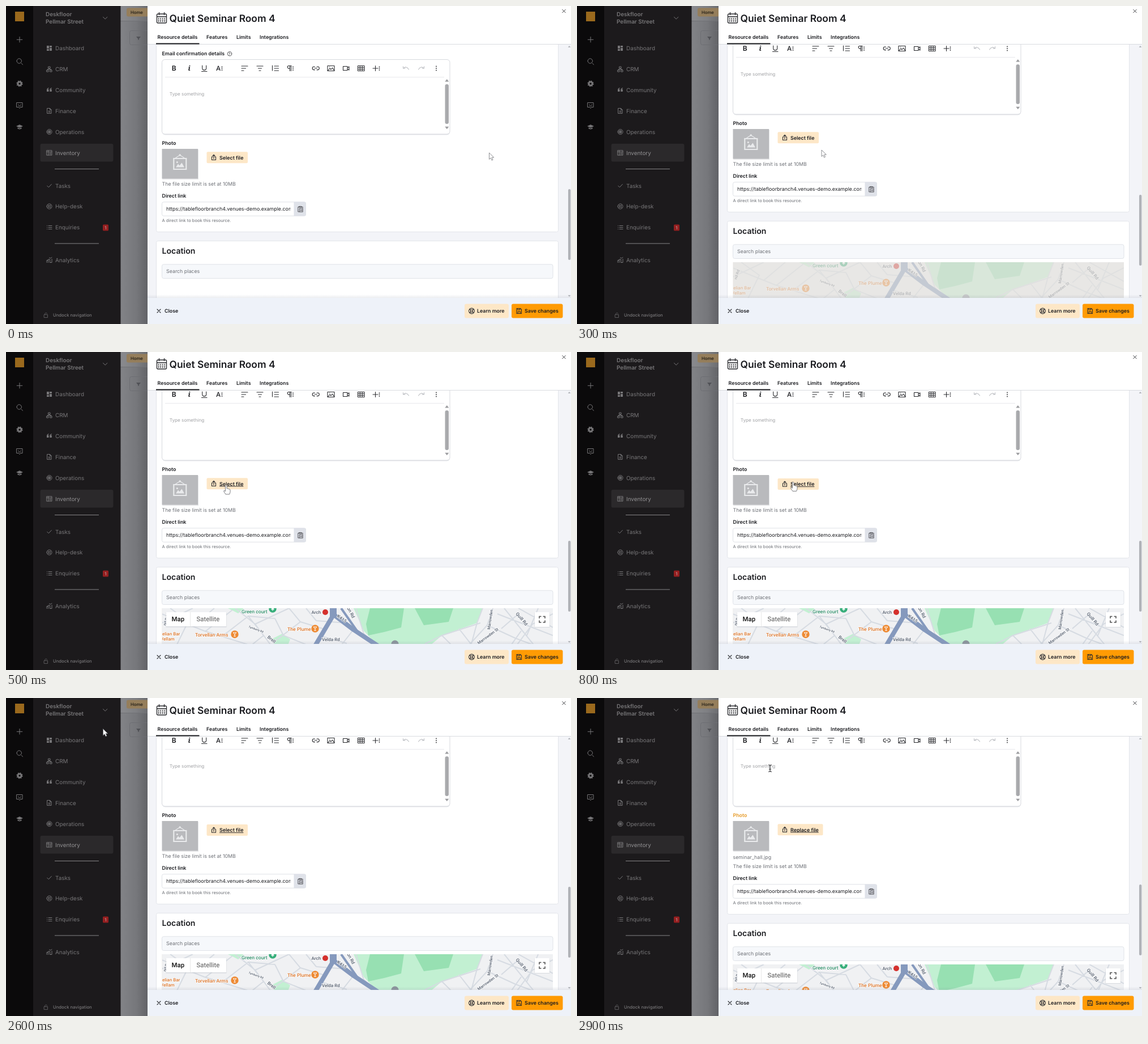
These frames come from a looping animation (998 by 561 pixels, 3 s). An HTML page:

```html
<!DOCTYPE html>
<html lang="en">
<head>
<meta charset="utf-8">
<title>Resource photo upload</title>
<style>
html, body { margin: 0; width: 100%; height: 100%; overflow: hidden; background: #fff }
svg { display: block; width: 100vw; height: 100vh }
text { font: 400 8.86px Inter, sans-serif; fill: #1b1c20; text-rendering: geometricPrecision; white-space: pre }
.b { font-weight: 600 }
.h { font-weight: 600; font-size: 14.1px }
.t { font-weight: 600; font-size: 17.4px }
.g { fill: #6c6f75 }
.dim text { fill: #777678; font-size: 9.9px }
.i { fill: none; stroke: #2b2c30; stroke-width: 1.1; stroke-linecap: round; stroke-linejoin: round }
.dim .i { stroke: #777678; stroke-width: 1 }
.f { fill: #2b2c30; stroke: none }
.dim .f { fill: #777678; stroke: none }
.card { fill: #fff; stroke: #e3e5ea }
.map text { font: 500 8px Roboto, sans-serif; fill: #515b6b; paint-order: stroke; stroke: #fff; stroke-width: 1.4px }
.map .food { fill: #d9752c }
.map .ctl { font-size: 11.4px; stroke: none; fill: #565656 }
.road { fill: none; stroke: #d6dbe2; stroke-width: 2 }
.main { fill: none; stroke: #8599bd; stroke-width: 8; stroke-linejoin: round }
</style>
</head>
<body>
<svg viewBox="0 0 998 561" preserveAspectRatio="none">
<defs>
  <linearGradient id="shade"><stop stop-color="#828387"/><stop offset=".6" stop-color="#76777b"/><stop offset="1" stop-color="#626367"/></linearGradient>
  <linearGradient id="fade" x2="0" y2="1"><stop stop-color="#8890a0" stop-opacity="0"/><stop offset="1" stop-color="#8890a0" stop-opacity=".16"/></linearGradient>
  <clipPath id="view"><path d="M250 68H998V515H250z"/></clipPath>
  <clipPath id="mapClip"><path d="M276 452H966V600H276z"/></clipPath>
  <clipPath id="linkClip"><path d="M276 340H502.500V375H276z"/></clipPath>
</defs>

<!-- dimmed page -->
<g class="dim">
  <path fill="url(#shade)" d="M202 0H250V561H202z"/>
  <path fill="#fff" opacity=".06" d="M202 0H250V26H202z"/>
  <path stroke="#707175" d="M202 26.500H250"/>
  <rect x="213" y="3.500" width="45" height="15" rx="3" fill="#957e5b"/>
  <text x="220" y="14" class="b" style="font-size:7.700px;fill:#29241c">Home</text>
  <rect x="218.500" y="43.500" width="40" height="25" rx="3" fill="none" stroke="#6d6e73"/>
  <path fill="#505156" d="M230 54h8l-3 3.500v2h-2v-2z"/>
  <path fill="#0b0a0b" d="M0 0H48V561H0z"/>
  <path fill="#1c1a1c" d="M48 0H202.500V561H48z"/>
  <rect x="16" y="10" width="16" height="17" fill="#9a691d"/>
  <text x="70" y="18" class="b">Deskfloor</text>
  <text x="70" y="31" class="b">Pellmar Street</text>
  <path class="i" d="M171.500 19.500l3.700 3.500 3.700-3.500M24 54.500v9.500M19.200 59.300h9.600M27.200 101l2.300 2.500M19 97a4.200 4.200 0 1 0 8.400 0a4.200 4.200 0 1 0-8.400 0"/>
  <circle class="i" cx="24" cy="137" r="3.100" style="stroke-width:2.800"/>
  <circle class="i" cx="24" cy="137" r="4.800" style="stroke-width:1.600;stroke-dasharray:1.900 1.870;stroke-linecap:butt"/>
  <path class="i" d="M19 170.500h10v8h-3.500l-1.500 2-1.500-2H19zM22 173.500v.5M26 173.500v.5M22 176q2 1.300 4 0"/>
  <path class="f" d="M18 212l6-2.700 6 2.700-6 2.700zM20.500 214.300l3.500 1.600 3.500-1.600v2.300q-3.500 1.600-7 0z"/>
  <rect x="60.500" y="243" width="129" height="31.500" rx="3" fill="#2b292b"/>
  <g id="nav"></g>
  <path stroke="#858486" d="M86 287.500H164M86 419H164"/>
  <rect x="171" y="385.500" width="10" height="11" rx="1.500" fill="#951f20"/>
  <text x="174.300" y="393.800" style="font-size:7.500px;fill:#c8b8b8">1</text>
  <path class="i" d="M67.500 544.500h6v5h-6zM68.700 544.500v-2q2-2.600 4 0" style="stroke:#59585a"/>
  <text x="83" y="548" style="font-size:7.700px;font-weight:500">Undock navigation</text>
</g>

<!-- drawer -->
<path fill="#f3f4f8" d="M250 0H998V561H250z"/>
<g clip-path="url(#view)"><g id="scroll">
  <rect id="card" class="card" x="265.500" y="20" width="710" height="378.500" rx="3"/>
  <text class="b" x="275.500" y="87">Email confirmation details</text>
  <circle class="i" cx="395" cy="84.300" r="3.700" style="stroke-width:.8"/>
  <text x="393.300" y="86.800" style="font-size:6.500px">?</text>
  <rect x="276" y="95.500" width="508" height="132" rx="5" fill="#e4e6ea"/>
  <rect x="275.500" y="94.500" width="508.500" height="131.500" rx="5" fill="#fff" stroke="#d7d9de"/>
  <path stroke="#e8e9ec" d="M281 125.500H774"/>
  <g id="tools">
    <text x="292.700" y="114" style="font-size:12px;font-weight:600">B</text>
    <text x="321.600" y="114" style="font:italic 600 12px 'Noto Serif',serif">i</text>
    <text x="371" y="114" style="font-size:11.500px;font-weight:500">A</text>
    <path class="i" d="M346.700 105v4.500q0 3.600 3.500 3.600t3.500-3.600V105M345.500 115.500h9.500
      M416 106h11M416 110h7.500M416 114h4M443 106h11M445.500 110h6M447 114h3
      M474 106h7.500M474 110h7.500M474 114h7.500M470.500 105v9
      M504 105.500h-4.500a2.300 2.300 0 0 0 0 4.600h1.500M501.300 105.500v9M503.500 105.500v9
      M545.500 107h-1.500a2.800 2.800 0 0 0 0 5.600h1.500M549 107h1.500a2.800 2.800 0 0 1 0 5.600h-1.500M545 109.800h4.500
      M568 105.500h12v9h-12zM569 113.500l3-3.500 2 2 2.500-3 3 4.500M571.500 107.500v.3
      M595.500 106.500h7.500v7h-7.500zM603 109l3-2v6l-3-2
      M621.500 105.500h11.500v9h-11.500zM621.500 108.500h11.500M621.500 111.500h11.500M625.300 105.500v9M629.200 105.500v9
      M652.500 105.500v9M648 110h9"/>
    <path class="i" style="stroke:#bfc1c5" d="M701.500 106.500v3.500h3.500M702 110q5-5 9.500 2M738.500 106.500v3.500h-3.500M738 110q-5-5-9.500 2"/>
    <path class="i" style="stroke-width:1.800" d="M381.500 107.500v.01M381.500 110.300v.01M381.500 113.100v.01M507 107.500v.01M507 110.300v.01M507 113.100v.01M659.500 107.500v.01M659.500 110.300v.01M659.500 113.100v.01M760 106.500v.01M760 110v.01M760 113.500v.01"/>
  </g>
  <text x="288.800" y="157.500" style="font-size:8.150px;fill:#a2a3a6">Type something</text>
  <path fill="#9c9da0" d="M775.300 133.500h7l-3.500-4.500zM775.300 212.700h7l-3.500 4.500z"/>
  <rect x="775.500" y="138" width="6.500" height="70" rx="3" fill="#a9aaad"/>
  <text id="photo" class="b" x="275.500" y="245">Photo</text>
  <rect x="276" y="253" width="64" height="53" fill="#e3e4e6"/>
  <path fill="#b9babd" d="M275.500 252H339V304.500H275.500z"/>
  <path class="i" style="stroke:#e9eaec;stroke-width:2.200;stroke-linejoin:miter" d="M296.300 269h22v19h-22z"/>
  <path class="i" style="stroke:#e9eaec;stroke-width:1.300" d="M299.500 268l7.700-5 7.700 5"/>
  <circle cx="307.200" cy="263" r="1.700" fill="#e9eaec"/>
  <path fill="#e9eaec" d="M300 284.500l4-6 2.500 3 4-5 4.500 8z"/><circle cx="302.300" cy="275.500" r="1.500" fill="#e9eaec"/>
  <g id="button">
    <rect id="chip" x="354.500" y="257.300" width="72.500" height="20" rx="2" fill="#fde7c7"/>
    <path class="i" d="M365 266h-1.500v5.500h7V266H369M367 269.500v-6.500M365 264.500l2-2 2 2"/>
    <text id="pick" class="b" x="377" y="270.500"></text>
  </g>
  <text id="file" class="g" x="275.500" y="319.200">seminar_hall.jpg</text>
  <g id="low">
    <text class="g" x="275.500" y="317">The file size limit is set at 10MB</text>
    <text class="b" x="275.500" y="338.300">Direct link</text>
    <rect x="275.500" y="345.800" width="254" height="24.500" rx="3" fill="#fff" stroke="#dfe2e7"/>
    <path fill="#dfe2e9" d="M508.500 345.500H527a3 3 0 0 1 3 3V367.500a3 3 0 0 1-3 3H508.500z"/>
    <path class="i" d="M518 354.500h-2.200v8.500h2.200M522 354.500h2.200v1.500M518 353.500h4v1.700h-4zM518.700 357h5.500v6.200h-5.500zM520.400 359v2.500M522.500 359v2.500" style="stroke:#44454a;stroke-width:.9"/>
    <text x="283" y="361.200" clip-path="url(#linkClip)">https://tablefloorbranch4.venues-demo.example.com/book</text>
    <text class="g" x="275.500" y="381" style="font-size:7.570px">A direct link to book this resource.</text>
    <rect class="card" x="265.500" y="414.500" width="710" height="300" rx="3"/>
    <text class="h" x="275.500" y="437">Location</text>
    <rect x="275.500" y="455.800" width="690.500" height="24.700" rx="3" fill="#f6f8fb" stroke="#e0e3e8"/>
    <text class="g" x="283" y="471.300">Search places</text>
    <path id="blank" fill="#e5e3df" d="M275.500 487H966V600H275.500z"/>
    <g transform="translate(0 35)"><g class="map" id="map" clip-path="url(#mapClip)">
      <path fill="#f0f1f3" d="M275 452H967V600H275z"/>
      <path fill="#c2f0d2" d="M614 452H842L832 478 770 500 735 530H668L632 492zM472 505l16-8 14 10-8 20h-20zM392 452h28l-10 9z"/>
      <path fill="#97e0b2" d="M643 452H703L698 486 668 494 640 500 636 480zM722 452H790L782 476 738 482z"/>
      <path class="road" d="M275 478L330 452M275 462L350 492 440 520M290 452L322 475 300 520M330 484L368 452M352 493L400 455M380 503L428 466 475 470M405 452L440 480 470 520M428 466L455 500 430 520M440 480L500 452M475 470L490 500 540 520M500 452L520 476 478 508M520 476L566 490M530 452L548 474M548 474L600 478M590 520L612 492M560 502L602 514M618 452L632 497 668 530M740 515L770 500 838 478M770 500L790 520M800 488L825 520M842 452L832 478 822 515M860 452L850 482 815 520M850 482L900 505 940 520M868 462L966 500M880 452L935 520M905 452L966 486M940 452L920 500M966 462L930 480 900 520M875 488L905 462M890 520L910 492"/>
      <path class="main" d="M577 466L545 520M577 462L614 490 658 519"/>
      <path class="main" style="stroke-width:12" d="M578 450V468"/>
      <path class="main" style="stroke-width:4" d="M592 452L620 492"/>
      <text class="food" x="269" y="499.500">melian Bar</text><text class="food" x="273" y="509">Vellam</text>
      <text class="food" x="334" y="502" style="font-size:8.700px">Torvellan Arms</text>
      <text class="food" x="497" y="492" style="font-size:8.700px">The Plume</text>
      <text x="416" y="461" style="font-size:8.700px;fill:#2d8c68">Green court</text>
      <text x="539.500" y="462">Arch</text>
      <text x="558" y="510">Velda Rd</text>
      <text transform="translate(584 467) rotate(36)">K415</text>
      <text transform="translate(602 452) rotate(62)">on Rd</text>
      <text transform="translate(282 483) rotate(-72)" style="font-size:7px">nd Rd</text>
      <text transform="translate(461 504) rotate(38)">Brell</text>
      <text transform="translate(428 486) rotate(20)" style="font-size:5px">Tamberly Rd</text>
      <text transform="translate(855 490) rotate(-82)" style="font-size:7px">Marrowden</text>
      <text transform="translate(835 516) rotate(-36)" style="font-size:7px">Marrowden St</text>
      <text transform="translate(900 462) rotate(50)">Quill Rd</text>
      <circle cx="564" cy="459" r="5" fill="#d5312d"/>
      <circle cx="687" cy="515" r="6.500" fill="#8b949c"/>
      <circle cx="471" cy="453" r="6.700" fill="#35ad79"/><path fill="#fff" d="M471 449.500l3 5h-2.400v2h-1.200v-2H468z"/>
      <g id="pins"></g>
      <g id="controls">
        <path fill="#b8bcc3" opacity=".45" d="M282.500 459.500H389.500V485.500H282.500zM933.500 459.500H960.500V486H933.500z"/>
        <path fill="#fff" d="M283 459H389V484H283zM934 459H960V485H934z"/>
        <path stroke="#e7e7e7" d="M325.500 459V484"/>
        <text class="ctl" x="292.500" y="475.300" style="fill:#111">Map</text>
        <text class="ctl" x="336.500" y="475.300" style="font-weight:400">Satellite</text>
        <path class="i" style="stroke:#555;stroke-width:1.600;stroke-linecap:butt;stroke-linejoin:miter" d="M942 470v-3.500h3.500M948.500 466.500h3.500v3.500M952 473.500v3.500h-3.500M945.500 477H942v-3.500"/>
      </g>
    </g></g>
  </g>
</g></g>
<path fill="#b1b3b8" d="M992.700 73h4.600l-2.300-3zM992.700 510h4.600l-2.300 3z"/>
<rect id="thumb" x="993" width="4.300" height="125" rx="2.100" fill="#b0b2b7"/>
<path fill="url(#fade)" d="M250 509H998V515H250z"/>

<path fill="#fff" d="M250 0H998V67H250z"/>
<path stroke="#d9dbe0" d="M250 67.500H998"/>
<path d="M265 65.500H341.500V67.500H265z" fill="#1b1c20"/>
<path class="i" style="stroke-width:1.400" d="M268.500 14h13a2 2 0 0 1 2 2v12a2 2 0 0 1-2 2h-13a2 2 0 0 1-2-2V16a2 2 0 0 1 2-2zM266.500 18.700h17M270.500 11.500v4M279.500 11.500v4"/>
<path class="i" style="stroke-width:1.900;stroke-dasharray:.01 3.500" d="M269.700 22h11.500M269.700 24.700h11.500M269.700 27.300h11.500"/>
<text class="t" x="288.500" y="27.800">Quiet Seminar Room 4</text>
<path class="i" style="stroke-width:.9" d="M982.700 6.200l5.600 5.600M988.300 6.200l-5.600 5.600"/>
<g style="font-size:9px">
  <text class="b" x="267.500" y="58">Resource details</text><text class="b" x="354" y="58">Features</text>
  <text class="b" x="407" y="58">Limits</text><text class="b" x="448" y="58">Integrations</text>
</g>

<path fill="#eef2f9" d="M250 515H998V561H250z"/>
<path class="i" d="M267 535l6 6M273 535l-6 6"/>
<text class="b" x="280" y="541.300">Close</text>
<rect x="810" y="525.500" width="78" height="25" rx="3" fill="#fde7c7"/>
<g class="i"><circle cx="822.500" cy="538" r="4.900"/><circle cx="822.500" cy="538" r="2"/><path d="M819 534.500l2 2M826 534.500l-2 2M819 541.500l2-2M826 541.500l-2-2"/></g>
<text class="b" x="832" y="541.300">Learn more</text>
<rect x="893" y="525.500" width="90.500" height="25" rx="3" fill="#ff9b04"/>
<path class="i" d="M902 533.500h6.500l2 2v7H902zM904 533.500v2.500h3.500v-2.500M904.300 542.500V539h4v3.500"/>
<text class="b" x="916" y="541.300">Save changes</text>

<path id="arrow" fill="#fff" stroke="#707277" stroke-width=".8" stroke-linejoin="round" d="M0 0V11.500L2.700 9 4.500 13.200 6.500 12.300 4.700 8.200H8.300z"/>
<path id="hand" fill="#fff" stroke="#606166" stroke-width=".8" stroke-linejoin="round" d="M-1.300 1.200Q0-.8 1.300 1.200V6.500Q2.800 5.600 3.800 7 5.200 6.500 6 7.700 7.300 7.700 7.300 9.500V12.500L6 16.500H-.8L-4 11.500Q-4.200 9.500-2.800 10L-1.300 11.300z"/>
<path id="beam" class="i" d="M-2.500-6Q0-6 0-4.500 0-6 2.500-6M0-4.500V4.500M-2.500 6Q0 6 0 4.500 0 6 2.500 6M-1.500 1.500h3"/>
</svg>
<script>
const $ = id => document.getElementById(id);
const ring = r => `M${-r} 0a${r} ${r} 0 1 0 ${2 * r} 0a${r} ${r} 0 1 0 ${-2 * r} 0`;

// label, centre y, icon, filled
const items = [
  ["Dashboard", 74.5, "M-4.500-4.500h4v5h-4zM.5-4.500h4v3h-4zM.5-.5h4v5h-4zM-4.500 1.500h4v3h-4z", 1],
  ["CRM", 111.5, "M-1.500-4.500h3v3h-3zM-4.500 1.500h3v3h-3zM1.500 1.500h3v3h-3zM0-1.500V0M-3 1.500V0H3v1.500"],
  ["Community", 148, "M-4.500 0q0-3 3.500-4v1.300q-1.500.7-1.500 1.700h1.500v4h-3.500zM.8 0q0-3 3.500-4v1.300q-1.500.7-1.500 1.700h1.500v4H.8z", 1],
  ["Finance", 185, "M-3.500-4.500H1l2.500 2.500v6.500h-7zM1-4.500V-2h2.500M-1.500.3h3M-1.500 2.300h3"],
  ["Operations", 222, ring(4.5) + "M-2-2h4v4h-4zM0-2v4M-2 0h4"],
  ["Inventory", 259, "M-4.500-4.200h9v8.400h-9zM-4.500-1.800h9M-2-4v8M0 .2h3M0 2.200h3"],
  ["Tasks", 317, "M-3.800.2l2.600 2.600 5-5.300"],
  ["Help-desk", 353.5, ring(4.5) + ring(1.8) + "M-3.200-3.200l2 2M3.200-3.200l-2 2M-3.200 3.200l2-2M3.200 3.200l-2-2"],
  ["Enquiries", 390.5, "M-1.500-3h6M-1.500 0h6M-1.500 3h6M-4-3h.2M-4 0h.2M-4 3h.2"],
  ["Analytics", 448, "M-4.500 4.500v-4h2.500v4M-2 4.500V-1H1v5.500M1 4.500h3.500v-6M0-4l2 1 2.500-1.500"],
];
$("nav").innerHTML = items.map(([label, y, d, solid]) =>
  `<path class="${solid ? "f" : "i"}" transform="translate(76.500 ${y})" d="${d}"/>
   <text x="87" y="${y + 3.5}"${label == "Inventory" ? ' style="fill:#929193"' : ""}>${label}</text>`).join("");
$("pins").innerHTML = [[546, 488], [404, 498]].map(([x, y]) =>
  `<g transform="translate(${x} ${y})"><circle r="6.700" fill="#ee8a33"/>
   <path d="M-3-3H3L0 .3zM0 0V3.300M-1.800 3.300h3.600" fill="none" stroke="#fff"/></g>`).join("");

const show = (id, on) => $(id).style.display = on ? "" : "none";
const move = (id, x, y) => $(id).setAttribute("transform", `translate(${x} ${y})`);

// time, x, y, pointer
const path = [
  [0, 853.5, 259, "arrow"], [100, 656.5, 288.5, "arrow"], [200, 520, 276, "arrow"], [300, 432, 254, "arrow"],
  [400, 395, 239.5, "hand"], [600, 382.5, 229.5, "hand"], [800, 381.7, 229, "hand"], [1200, 0, 0, ""],
  [2600, 171.5, 54.5, "arrow"], [2800, 300, 108, "arrow"], [2900, 341, 124, "beam"], [3000, 341, 124, "beam"],
];

function pointer(t) {
  const k = path.findLastIndex(p => p[0] <= t);
  const [t0, x0, y0, kind] = path[k], [t1, x1, y1, next] = path[k + 1];
  const u = next ? (t - t0) / (t1 - t0) : 0;
  for (const id of ["arrow", "hand", "beam"]) show(id, id == kind);
  if (kind) move(kind, x0 + (x1 - x0) * u, y0 + (y1 - y0) * u);
}

function draw(now) {
  const t = Math.floor(now % 3000 / 100) * 100; // screen updates ten times a second
  const scrolled = t >= 100, done = t >= 2800, hover = t >= 500;
  move("scroll", 0, scrolled ? -35 : 0);
  move("low", 0, done ? 18 : 0);
  $("card").setAttribute("height", done ? 396.5 : 378.5);
  $("thumb").setAttribute("y", done ? 329 : scrolled ? 333 : 323);
  show("blank", scrolled);
  $("map").style.opacity = Math.min(1, Math.max(0, (t - 200) / 300)); // tiles fade in
  show("controls", t >= 500);
  show("file", done);
  $("photo").style.fill = done ? "#e69a26" : "";
  $("pick").textContent = done ? "Replace file" : "Select file";
  $("pick").style.textDecoration = hover ? "underline" : "";
  $("chip").setAttribute("width", done ? 80 : 72.5);
  move("button", 0, done || t < 600 ? 0 : t >= 1200 && t < 2600 ? -.5 : .7);
  pointer(t);
  requestAnimationFrame(draw);
}
requestAnimationFrame(draw);
</script>
</body>
</html>
```
